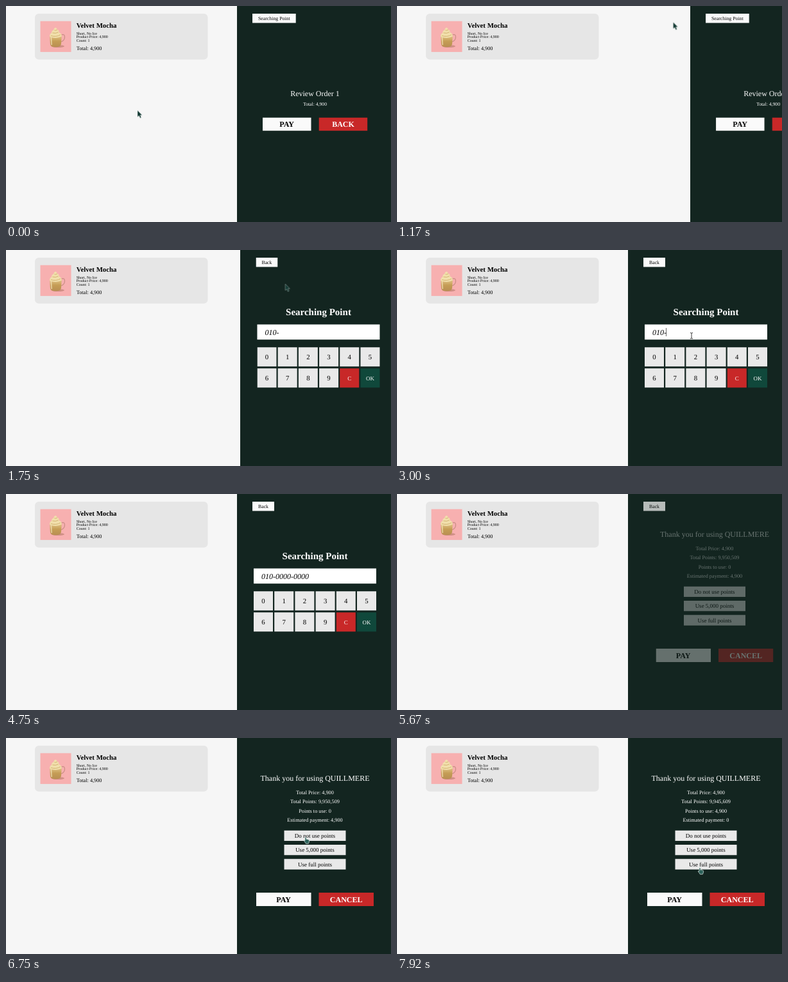
Write an HTML page that moves like this. It is 600 px wide and 338 px high and loops after 8 s.

```html
<!DOCTYPE html>
<html lang="en">
<head>
<meta charset="utf-8">
<title>Kiosk order</title>
<style>
  html, body { margin: 0; width: 100%; height: 100%; overflow: hidden; background: #f6f6f6; }
  svg { display: block; width: 100%; height: 100%; }
  text { font-family: "Liberation Serif", "Times New Roman", serif; text-rendering: geometricPrecision; }
  .mid { text-anchor: middle; }
  .bold { font-weight: bold; }
  .light { fill: #fafafa; }
  .white { fill: #fff; }
  .grey { fill: #e9e9e9; }
  .red { fill: #c82828; }
  .green { fill: #10483b; }
  .s8 { font-size: 7.8px; }
  .s9 { font-size: 9px; }
  .s11 { font-size: 10.8px; }
  .s12 { font-size: 12px; }

  .anim { animation: 8s linear infinite; }
  .step { animation: 8s step-end infinite; }

  /* Side panel and its screens */
  #panel { animation-name: slide; }
  @keyframes slide {
    0%, 12.35% { transform: none; animation-timing-function: ease-in-out; }
    17.5% { transform: translateX(240px); }
    17.68% { transform: translateX(240px); animation-timing-function: ease; }
    22.9%, 100% { transform: none; }
  }
  #review { animation-name: review; }
  @keyframes review { 0% { visibility: visible; } 17.5%, 100% { visibility: hidden; } }
  #search { animation-name: search; }
  @keyframes search { 0%, 69.8% { visibility: hidden; } 17.5% { visibility: visible; } 100% { visibility: hidden; } }
  #back { animation-name: back; }
  @keyframes back {
    0%, 17.49% { opacity: 0; }
    17.5%, 69.5% { opacity: 1; }
    74.3%, 100% { opacity: 0; }
  }
  #points { animation-name: appear; }
  @keyframes appear { 0%, 69.7% { opacity: 0; } 73%, 100% { opacity: 1; } }
  #settle { animation-name: settle; }
  @keyframes settle { 0% { transform: translateX(13.5px); } 75%, 100% { transform: none; } }
  #before { animation-name: before; }
  @keyframes before { 0% { opacity: 1; } 92.7%, 100% { opacity: 0; } }
  #after { animation-name: after; }
  @keyframes after { 0% { opacity: 0; } 92.7%, 100% { opacity: 1; } }

  /* Typing: a white cover and the caret step along the number */
  #typing { animation-name: typing; }
  @keyframes typing {
    0% { transform: none; }
    39.6% { transform: translateX(6px); }
    40.6% { transform: translateX(12px); }
    42.7% { transform: translateX(18px); }
    43.7% { transform: translateX(24px); }
    44.8% { transform: translateX(28px); }
    46.8% { transform: translateX(34px); }
    47.9% { transform: translateX(40px); }
    51.1% { transform: translateX(46px); }
    53.1%, 100% { transform: translateX(52px); }
  }
  #caret { animation-name: caret; }
  @keyframes caret {
    0%, 31.2%, 59.3% { opacity: 0; }
    25%, 37.4%, 64.6% { opacity: 1; }
    69.8%, 100% { opacity: 0; }
  }

  /* Pointer */
  #pointer { animation-name: travel; }
  @keyframes travel {
    0%, 1.6% { transform: translate(205px, 163.5px); animation-timing-function: ease-in-out; }
    10.5%, 14.7% { transform: translate(430.5px, 25.5px); }
    18.75% { transform: translate(431.5px, 39px); }
    22.5% { transform: translate(436px, 56px); animation-timing-function: ease-in-out; }
    29.3%, 80.1% { transform: translate(459px, 134px); }
    84.4% { transform: translate(467px, 155px); }
    89% { transform: translate(469px, 172px); }
    95.9%, 97.4% { transform: translate(469px, 180px); }
    99%, 100% { transform: translate(472px, 203px); }
  }
  #arrow { animation-name: arrow; }
  @keyframes arrow {
    0%, 13.5%, 80.2% { opacity: 1; }
    9.9%, 27.6%, 82.4% { opacity: 0; }
    100% { opacity: 0; }
  }
  #beam { animation-name: beam; }
  @keyframes beam { 0%, 39.6% { opacity: 0; } 27.6% { opacity: 1; } 100% { opacity: 0; } }
  #hand { animation-name: hand; }
  @keyframes hand { 0%, 13.5% { opacity: 0; } 9.9%, 82.4% { opacity: 1; } 100% { opacity: 1; } }
</style>
</head>
<body>
<svg viewBox="0 0 600 338" preserveAspectRatio="none">
  <defs>
    <linearGradient id="coffee" x2="0" y2="1">
      <stop offset="0" stop-color="#e3c88c"/>
      <stop offset=".5" stop-color="#c59d55"/>
      <stop offset="1" stop-color="#b98f52"/>
    </linearGradient>
  </defs>
  <rect width="600" height="338" fill="#f6f6f6"/>

  <!-- Order card -->
  <rect x="45" y="12" width="269.5" height="71.7" rx="6" fill="#e6e6e6"/>
  <rect x="53.5" y="23.7" width="48" height="48.2" fill="#f7b0b0"/>
  <ellipse cx="81" cy="63" rx="10" ry="2" fill="#d08f86"/>
  <path d="M86 45.5q5.5-2.5 5.500 3t-5.5 7.5" fill="none" stroke="#c98d84" stroke-width="1.2"/>
  <path d="M68.2 46h18.6l-.8 13q-.5 4-4 4.700-5 1-9.500 0-3.300-.7-3.600-4.700z" fill="url(#coffee)"/>
  <path d="M69.500 48h1.600l.7 13h-1.300z" fill="#efdcae"/>
  <path d="M68.2 48q-.5-4.500 3-6-.5-3.500 3-4.500.5-3.500 4-3.700 0 2 2 3 3 1.700 2.300 4.500 4.500 1.700 4.300 6.200-9 4.500-18.600.5z" fill="#f1dfac"/>
  <path d="M70 46.500q8 2.500 15-1.500M72.500 42q5 1.500 9-1M75.500 38q2 .8 4.500-.8" fill="none" stroke="#cfae6c" stroke-width=".9"/>
  <text class="bold" x="109.700" y="33.700" font-size="10.75">Velvet Mocha</text>
  <g font-size="6">
    <text x="109.700" y="44.600">Short, No Ice</text>
    <text x="109.700" y="50.400">Product Price: 4,900</text>
    <text x="109.700" y="56.400">Count: 1</text>
  </g>
  <text x="109.700" y="69" font-size="8.25">Total: 4,900</text>

  <g id="panel" class="anim">
    <rect x="360" width="240" height="338" fill="#132520"/>

    <g id="review" class="step">
      <rect class="light" x="384" y="12" width="67.7" height="14.5"/>
      <text class="mid s8" x="417.8" y="22">Searching Point</text>
      <text class="mid s12 white" x="481.5" y="140.5">Review Order 1</text>
      <text class="mid white" x="481.5" y="155.5" font-size="7.7">Total: 4,900</text>
      <rect class="light" x="400" y="174.7" width="75.5" height="20.5"/>
      <rect class="red" x="487.7" y="174.7" width="75.5" height="20.5"/>
      <text class="mid bold s12" x="437.7" y="189">PAY</text>
      <text class="mid bold s12 white" x="525.5" y="189">BACK</text>
    </g>

    <g id="back" class="anim">
      <rect class="light" x="384" y="12" width="34" height="14.5"/>
      <text class="mid s8" x="401" y="22">Back</text>
    </g>

    <g id="search" class="step">
      <text class="mid bold white" x="481.5" y="102" font-size="15">Searching Point</text>
      <rect class="white" x="386" y="116.5" width="191" height="23.7"/>
      <text class="s12" x="398" y="132.5" font-style="italic">010-0000-0000</text>
      <g id="typing" class="step">
        <rect class="white" x="420" y="118" width="56" height="20"/>
        <rect id="caret" class="step" x="419.3" y="122" width=".6" height="13"/>
      </g>
      <g class="grey">
        <path d="M386 152.3h30v30h-30zm32.2 0h30v30h-30zm32.2 0h30v30h-30zm32.2 0h30v30h-30zm32.2 0h30v30h-30zm32.2 0h30v30h-30z"/>
        <path d="M386 185.3h30v30h-30zm32.2 0h30v30h-30zm32.2 0h30v30h-30zm32.2 0h30v30h-30z"/>
      </g>
      <rect class="red" x="514.8" y="185.3" width="30" height="30"/>
      <rect class="green" x="547" y="185.3" width="30" height="30"/>
      <g class="mid s11">
        <text x="401" y="171">0</text><text x="433.2" y="171">1</text><text x="465.4" y="171">2</text>
        <text x="497.6" y="171">3</text><text x="529.8" y="171">4</text><text x="562" y="171">5</text>
        <text x="401" y="204">6</text><text x="433.2" y="204">7</text><text x="465.4" y="204">8</text>
        <text x="497.6" y="204">9</text>
      </g>
      <text class="mid s9 light" x="529.8" y="203.5">C</text>
      <text class="mid s9 light" x="562" y="203.5">OK</text>
    </g>

    <g id="points" class="anim">
      <g id="settle" class="step">
        <text class="mid s12 white" x="481.5" y="66.6">Thank you for using QUILLMERE</text>
        <g class="mid white" font-size="8.25">
          <text x="481.5" y="88">Total Price: 4,900</text>
          <g id="before" class="step">
            <text x="481.5" y="102.4">Total Points: 9,950,509</text>
            <text x="481.5" y="116.8">Points to use: 0</text>
            <text x="481.5" y="131.2">Estimated payment: 4,900</text>
          </g>
          <g id="after" class="step">
            <text x="481.5" y="102.4">Total Points: 9,945,609</text>
            <text x="481.5" y="116.8">Points to use: 4,900</text>
            <text x="481.5" y="131.2">Estimated payment: 0</text>
          </g>
        </g>
        <path class="grey" d="M433.5 144.7h96v16.3h-96zm0 22.3h96v16.3h-96zm0 22.3h96v16.5h-96z"/>
        <g class="mid s9">
          <text x="481.5" y="156">Do not use points</text>
          <text x="481.5" y="178.2">Use 5,000 points</text>
          <text x="481.5" y="200.5">Use full points</text>
        </g>
        <rect class="light" x="390" y="242" width="85.5" height="21"/>
        <rect class="red" x="487.5" y="242" width="85.5" height="21"/>
        <text class="mid bold s12" x="432.7" y="256.6">PAY</text>
        <text class="mid bold s12 white" x="530.2" y="256.6">CANCEL</text>
      </g>
    </g>
  </g>

  <g id="pointer" class="anim">
    <path id="arrow" class="step" d="M0 0v10l2.300-2 1.700 3.800 1.800-.8-1.700-3.700h3z" fill="#143a34" stroke="#cfdad7" stroke-width=".4"/>
    <path id="beam" class="step" d="M-2-4.500q2 0 2 1.200 0-1.200 2-1.200M0-3.300v6.800M-2 4.700q2 0 2-1.200 0 1.200 2 1.200" fill="none" stroke="#222" stroke-width=".9"/>
    <path id="hand" class="step" d="M-1 .5q1-1.200 2 0v3q1.300-.6 1.800.3 1.200-.4 1.500.5 1.300-.2 1.300 1.200 0 3-1.300 4.700H.3q-1-2-3-4.300 0-1.300 1.700-.4z" fill="#2d625a" stroke="#dfe8e6" stroke-width=".7"/>
  </g>
</svg>
</body>
</html>
```
